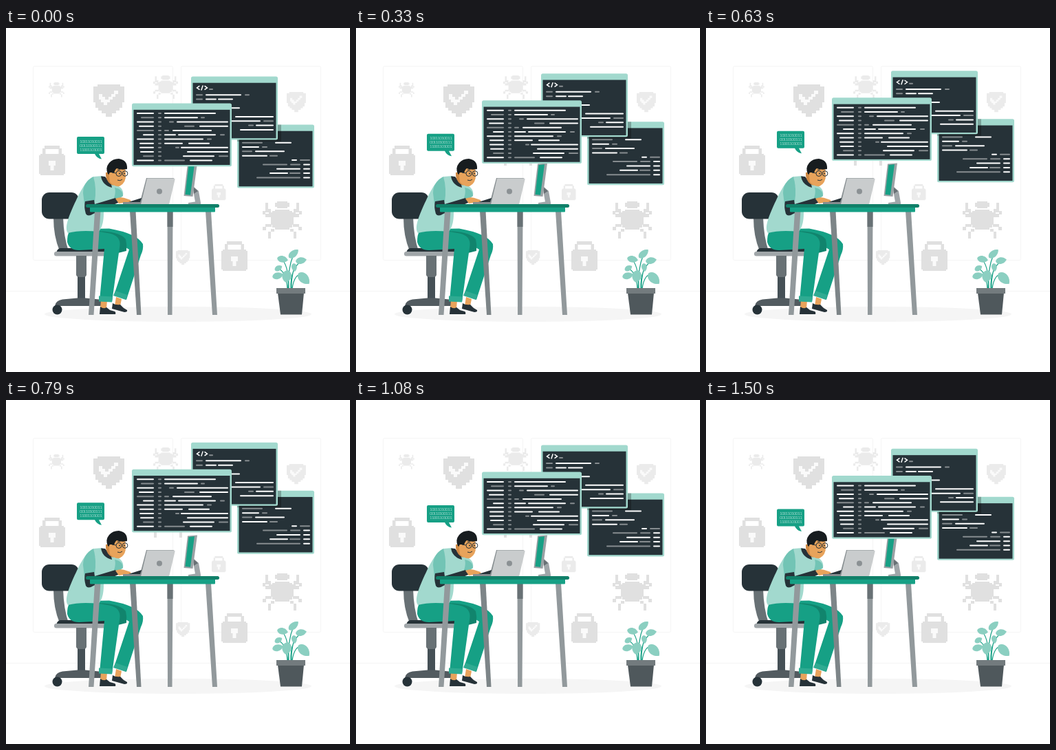
An HTML page that plays this animation: 500x500 px, repeating every 1540 ms.

```html
<!DOCTYPE html>
<html lang="en">
<head>
<meta charset="utf-8">
<style>
  html, body { margin: 0; width: 100%; height: 100%; overflow: hidden; background: #fff; }
  svg { display: block; width: 100vw; height: 100vh; }
  .skin { fill: #e8a35b; }
  .dark { fill: #263238; }
  .teal { fill: #16a085; }
  .pale { fill: #a2d9ce; }
  .sleeve { fill: #72c4b5; }
  .mid { fill: #687175; }
  .code { fill: none; stroke: #fff; stroke-width: 2; stroke-linecap: round; }
  .dim { stroke: #868c8f; }
  text { font: 300 6.2px Lato, sans-serif; letter-spacing: -.67px; fill: #fff; }
</style>
</head>
<body>
<svg viewBox="0 0 500 500">
  <defs>
    <g id="lock">
      <path d="M5 12V4h3V0h22v4h3v8h-4.500V5h-19v7zM2 12h34v2h2v27h-2v2H2v-2H0V14h2z"/>
      <path fill="#fafafa" d="M14 22h10v7h-2.500v7h-5v-7H14z"/>
    </g>
    <g id="shield">
      <path d="M0 3H6V0H39V3H45V26H42V34H38V38H33V42H27V47H18V42H12V38H7V34H3V26H0z"/>
      <path fill="#fafafa" d="M8 14h5v4h4v4h5v-4h4v-4h4v-5h6v5h-4v4h-4v4h-4v4h-4v4h-5v-4h-4v-4H8z"/>
    </g>
    <g id="legs">
      <path d="M4 2h4v9h4v5h3v4H9v-4H4zM0 14h4v4h8v5H4v-4H0zM0 37h4v-4h9v4H5v5H0zM8 54V44h4v-4h5v4h-5v10z"/>
    </g>
    <g id="bug">
      <path d="M21 0h15v2h3v6h-3v2H21V8h-3V2h3zM18 12h21v2h4v5h2v15h-2v4h-4v3H18v-3h-4v-4h-2V19h2v-5h4z"/>
      <use href="#legs"/><use href="#legs" transform="matrix(-1 0 0 1 57 0)"/>
    </g>
  </defs>

  <g fill="none" stroke="#f5f5f5">
    <rect x="39.500" y="55.500" width="203" height="282" rx="2"/>
    <rect x="254.500" y="55.500" width="203" height="282" rx="2"/>
    <path d="M0 382.500H500"/>
  </g>
  <ellipse cx="250" cy="416" rx="194" ry="11" fill="#f5f5f5"/>

  <g fill="#e0e0e0">
    <use href="#shield" x="127" y="82"/>
    <use href="#lock" x="48" y="171"/>
    <use href="#lock" x="313" y="310"/>
    <use href="#bug" x="373" y="252"/>
    <use href="#bug" x="207" y="146"/>
  </g>
  <g fill="#ebebeb">
    <use href="#bug" transform="translate(62 79) scale(.4)"/>
    <use href="#bug" transform="translate(214 69) scale(.63)"/>
    <use href="#shield" transform="translate(408 93) scale(.62)"/>
    <use href="#shield" transform="translate(247 323) scale(.45)"/>
    <use href="#lock" transform="translate(299 227) scale(.54)"/>
  </g>

  <!-- monitor -->
  <path fill="#a0a6a9" d="M272 230l8 7 3 17v2h-18v-2l10-1.500-2-11z"/>
  <path class="mid" d="M272 231l7 6-6 4z"/>
  <path fill="#9aa1a4" d="M264 197.500l14-1-6.500 48.500-13-1z"/>
  <path class="teal" d="M265.500 199l8.500-.8-6 44.500-7.500-.7z"/>

  <g id="floating">
    <g id="windows"></g>
    <path class="teal" d="M105 158.500h36q2 0 2 2v21q0 2-2 2h-6l4 7.500q-7-1-10-7.500h-24q-2 0-2-2v-21q0-2 2-2z"/>
    <text x="107" y="167">10011010011</text>
    <text x="107" y="173">00110100111</text>
    <text x="107" y="179">11001101001</text>
  </g>

  <!-- plant -->
  <g fill="none" stroke="#16a085" stroke-width="1.200">
    <path d="M411 379Q409 350 418 329M410 379Q412 350 402 337M414 379Q413 350 430 338M409 379Q408 355 395 349M415 379Q414 366 419 348M416 379Q419 356 432 358"/>
  </g>
  <g id="leaves" fill="#8bcfc1"></g>
  <path fill="#4f585c" d="M395 385h38l-3 31.500h-31z"/>
  <path fill="#737b7e" d="M393 378h42v8h-42z"/>

  <!-- chair -->
  <path class="mid" d="M69 275h14q1 30 8 49H78Q69 303 69 275z"/>
  <rect class="dark" x="52" y="239" width="54" height="38.500" rx="11"/>
  <path class="dark" d="M79 320h65v7H73q1-6 6-7z"/>
  <rect x="70" y="325" width="77" height="6.500" rx="3" fill="#a0a6a9"/>
  <path fill="#455056" d="M104 360h11v36h-11z"/>
  <path class="mid" d="M102 331h15v28q-1 3-4 3h-7q-3 0-4-3z"/>
  <path fill="#525b60" d="M71 404q1-8 11-9.500l22-2h11l25 2.500v9z"/>
  <circle class="dark" cx="74.500" cy="409.500" r="7"/>

  <!-- legs and feet -->
  <path class="skin" d="M160 391l8 3-2 10h-8zM138 396h9l-1 12h-9z"/>
  <path class="dark" d="M155 400q4 3 11 2 4 5 10 8 1 3-4 3l-18-5zM137 405q5 4 9 1l5 4 7 2q2 1 1 4h-23z"/>
  <path class="teal" d="M118 292l32-.5q40 7 49 22.500 1 8-3 16l-21 65-18-7 22-66-20-12z"/>
  <path fill="#11846d" d="M128 295q37 0 46 12 2 8 1 17l-12 3z"/>
  <path class="teal" d="M92 296q-3 4-3 15 3 12 17 12l37-2-7 75 18 2 11.500-82q1-14-15-17.500L118 293z"/>
  <path fill="#2fab92" d="M135 389.500l20 1-1 8-19-1zM159 382l17.500 6-2.500 7-18-6z"/>

  <!-- torso and head -->
  <path class="pale" d="M128 216c-13 4-23 28-31 45-7 16-12 30-7 37q18-5 45-2c8-11 7-24 7-37l21-9 7-6q2-11-10-16l-20-13z"/>
  <path class="sleeve" d="M127 216q-15 8-15 24l2 16 15-4q3-19-2-36zM158 232q12 2 12 12l-8 5-5-2q3-8 1-15z"/>
  <path class="dark" d="M138 215.500q2 13 16 16.500l-1-5-9-11zM115 252l13-2 1 6 30-9 6 6-38 17q-8 5-11 0-3-10-1-18z"/>
  <path fill="#cf8a45" d="M145 210l11-1v20q-9-3-11-14z"/>
  <path class="skin" d="M149 206l12-5 12 1 1 10q1 13-9 18-8 1-14-6zM159 248q7-3 13-1l9 3q1 3-2 3l-15 2z"/>
  <path fill="#171c1f" d="M148 212q-4-9 2-16 5-6 14-6 13 2 12 15-8 2-15-1-3 2-4 7l-5-1q-2 0-2 3z"/>
  <circle class="skin" cx="153" cy="213" r="3"/>
  <g fill="none" stroke="#263238" stroke-width="1">
    <circle cx="164" cy="211.500" r="4"/><circle cx="173" cy="211.500" r="3.800"/>
    <path d="M154 210l6 1M162 221q4 2 7-1M162 206l4-.5"/>
  </g>
  <circle class="dark" cx="165" cy="211.500" r="1"/><circle class="dark" cx="172" cy="211.500" r="1"/>

  <!-- laptop -->
  <path fill="#868d90" d="M170 253h26v3.500h-26zM204 218h40l-9 38h-41z"/>
  <path class="dark" d="M178 253l19-6-2 6z"/>
  <path fill="#c9cccd" d="M205 218.500h39q2 0 1.500 2l-8 34q-.5 2-2.500 2h-39z"/>
  <circle cx="223" cy="237.500" r="4" fill="#8b9194"/>

  <!-- desk -->
  <g fill="#92999c">
    <path d="M129 266h8.500l-10 151H120zM234.500 266h8l-1 151H235zM290 266h8l9 151h-7z"/>
    <path fill="#7d8588" d="M180 266h8.500l8 151H190z"/>
  </g>
  <path class="mid" d="M234.500 266h8v23h-8z"/>
  <rect class="teal" x="122" y="260" width="182" height="7.500" rx="1"/>
  <rect x="116" y="256" width="194" height="5" rx="2.500" fill="#118069"/>
</svg>
<script>
  const ROW_STEP = 6.23;

  // Rows are separated by "/"; each bar is "start-end", with a leading "~" for a dim one.
  const bars = (rows, top, step = ROW_STEP) => {
    let bright = '', dim = '';
    rows.split('/').forEach((row, i) => {
      for (const bar of row.split(' ').filter(Boolean)) {
        const [from, to] = bar.replace('~', '').split('-').map(Number);
        const d = `M${from + 1} ${top + i * step}H${to - 1}`;
        if (bar[0] === '~') dim += d; else bright += d;
      }
    });
    return `<path class="code" d="${bright}"/><path class="code dim" d="${dim}"/>`;
  };

  const frame = (x, y, w, h) =>
    `<rect class="pale" x="${x}" y="${y}" width="${w}" height="${h}" rx="2.5"/>
     <rect class="dark" x="${x + 2.5}" y="${y + 9.3}" width="${w - 5}" height="${h - 11.5}"/>`;

  const rightRows = '~343-373 391-415/343-368 ~372-380/~343-358 362-405/343-380 ~383-395/' +
    '415-423 ~427-442/~373-409 ~413-428 432-442/393-428 432-442/383-410 ~412-428 432-442/~364-428 432-442';
  const backRows = '~276-286 290-342 ~347-354/~276-286 290-306 308-330//320-340//' +
    '333-389/320-370 ~374-389/~352-360 363-389/340-389';
  const frontRows = [
    '190-215 230-305', '~196-215 230-279 ~283-289', '190-215 ~237-244 248-323',
    '193-215 ~259-274 281-323', '~190-215 ~230-237 242-299', '199-215 230-247 250-305 ~311-318',
    '190-215 230-287 ~292-299', '194-215 230-257 265-296', '194-215 ~246-252 254-323',
    '195-215 263-323', '~199-215 257-303 ~309-323', '190-215 ~230-260 267-300'
  ].map(row => row + ' ~221-226').join('/');

  document.getElementById('windows').innerHTML =
    frame(336, 140.9, 112, 92) + bars(rightRows, 167.1, 6.35) +
    '<path opacity=".25" d="M336 140.900h64v24.500h-64z"/>' +
    frame(269, 70.9, 126, 92) + bars(backRows, 97.6, 6.35) +
    `<path class="code" style="stroke-width:1.5" d="M281 84.900l-3.500 2.500 3.500 2.500M286 84.400l-2 6M289 84.900l3.500 2.500-3.500 2.500"/>
     <path class="code dim" d="M296 89.400h4"/>` +
    frame(183, 110, 145, 91.7) + bars(frontRows, 124.5);

  const leaves = [
    [418, 328, 9, 5, -40], [402, 336, 8, 5, 10], [429, 338, 8, 5, -10], [396, 349, 6, 4, -30],
    [419, 348, 6, 4, 80], [395, 360, 8, 5, -15], [408, 361, 9, 7, 100], [433, 364, 11, 7, 45]
  ];
  document.getElementById('leaves').innerHTML = leaves.map(([x, y, length, width, turn]) =>
    `<path d="M-1 0C-.8-1.200.4-1.400 1 0C.4 1.400-.8 1.200-1 0z"
      transform="translate(${x} ${y}) rotate(${turn}) scale(${length} ${width})"/>`).join('');

  const LOOP = 1540, LEAD = 35, RISE = 10;
  const floating = document.getElementById('floating');
  const start = performance.now();
  function draw() {
    const phase = ((performance.now() - start + LEAD) % LOOP) / LOOP;
    const lift = RISE * (1 - Math.abs(2 * phase - 1));
    floating.setAttribute('transform', `translate(0 ${-lift})`);
    requestAnimationFrame(draw);
  }
  draw();
</script>
</body>
</html>
```
